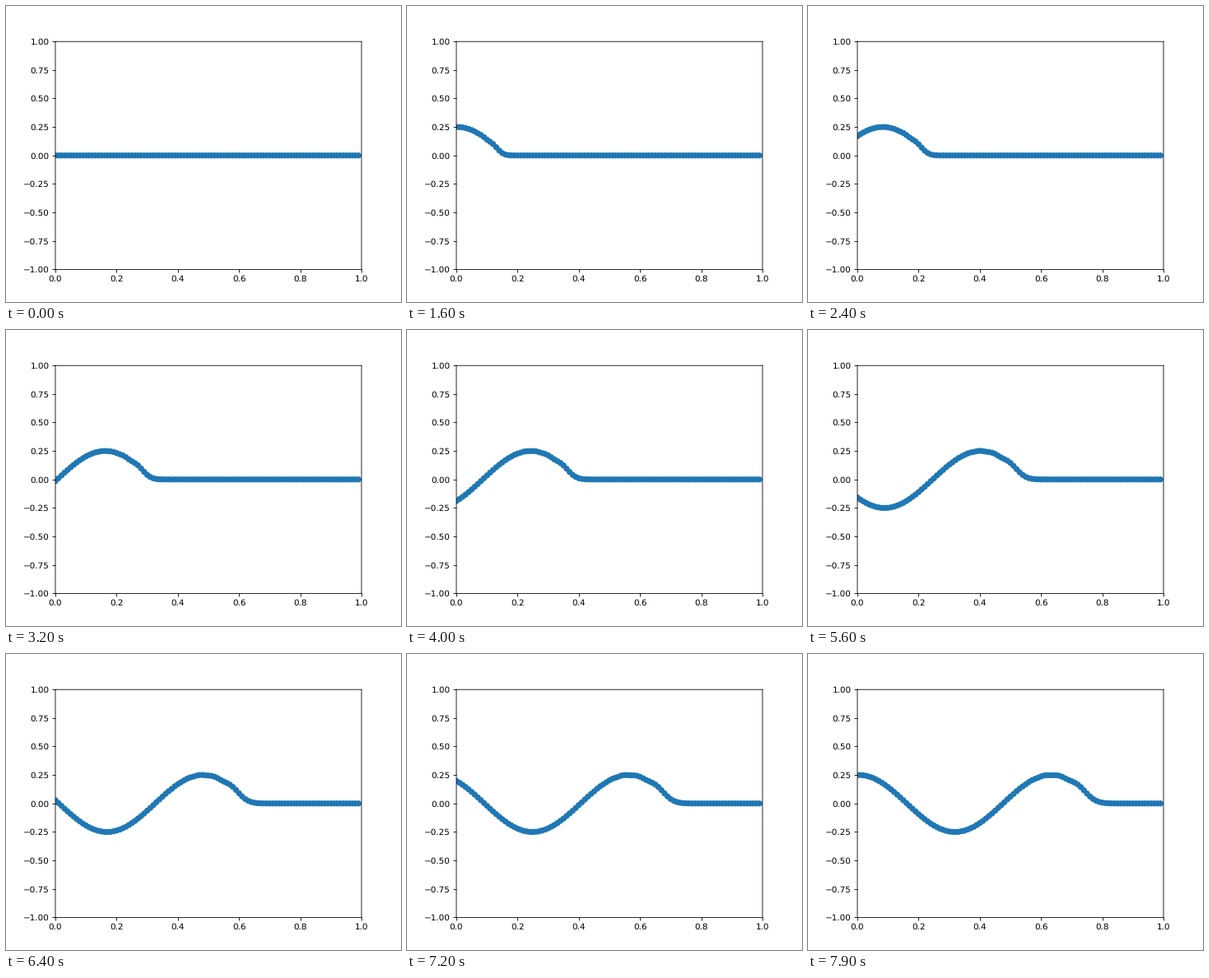
A matplotlib script for the animation above (8000 ms loop, 480 by 360 pixels).

```python
import matplotlib.pyplot as plt
import numpy as np
from matplotlib.animation import FuncAnimation

FRAMES = 80
INTERVAL = 100      # ms
STEPS = 10          # integration steps per frame
DX = 0.01
DT = 0.1 / STEPS
SPEED = 0.1
AMPLITUDE = 0.25
BLUE = "#1f77b4"

# Soft, sub-pixel rendering of lines and labels
plt.rcParams.update({"path.snap": False, "text.hinting": "none"})

x = np.arange(100) * DX


def simulate():
    """Shape of a string at rest whose left end is shaken by a sine."""
    u = np.zeros_like(x)
    v = np.zeros_like(x)
    shapes = [u.copy()]
    k = (SPEED / DX) ** 2
    for step in range(1, (FRAMES - 1) * STEPS + 1):
        v[1:-1] += k * DT * (u[2:] - 2 * u[1:-1] + u[:-2])
        u[1:-1] += DT * v[1:-1]
        u[0] = AMPLITUDE * np.sin(step * DT)
        if step % STEPS == 0:
            shapes.append(u.copy())
    return shapes


shapes = simulate()

fig, ax = plt.subplots(figsize=(6.4, 4.8), dpi=75)
ax.set_xlim(0, 1)
ax.set_ylim(-1, 1)
# One colour per dot keeps the dots from being rounded to whole pixels
dots = ax.scatter(x, shapes[0], s=36, linewidths=1, c=[BLUE] * len(x))


def update(i):
    dots.set_offsets(np.column_stack([x, shapes[i]]))
    return dots,


anim = FuncAnimation(fig, update, frames=FRAMES, interval=INTERVAL,
                     repeat=True, repeat_delay=0, blit=False)
plt.show()
```
